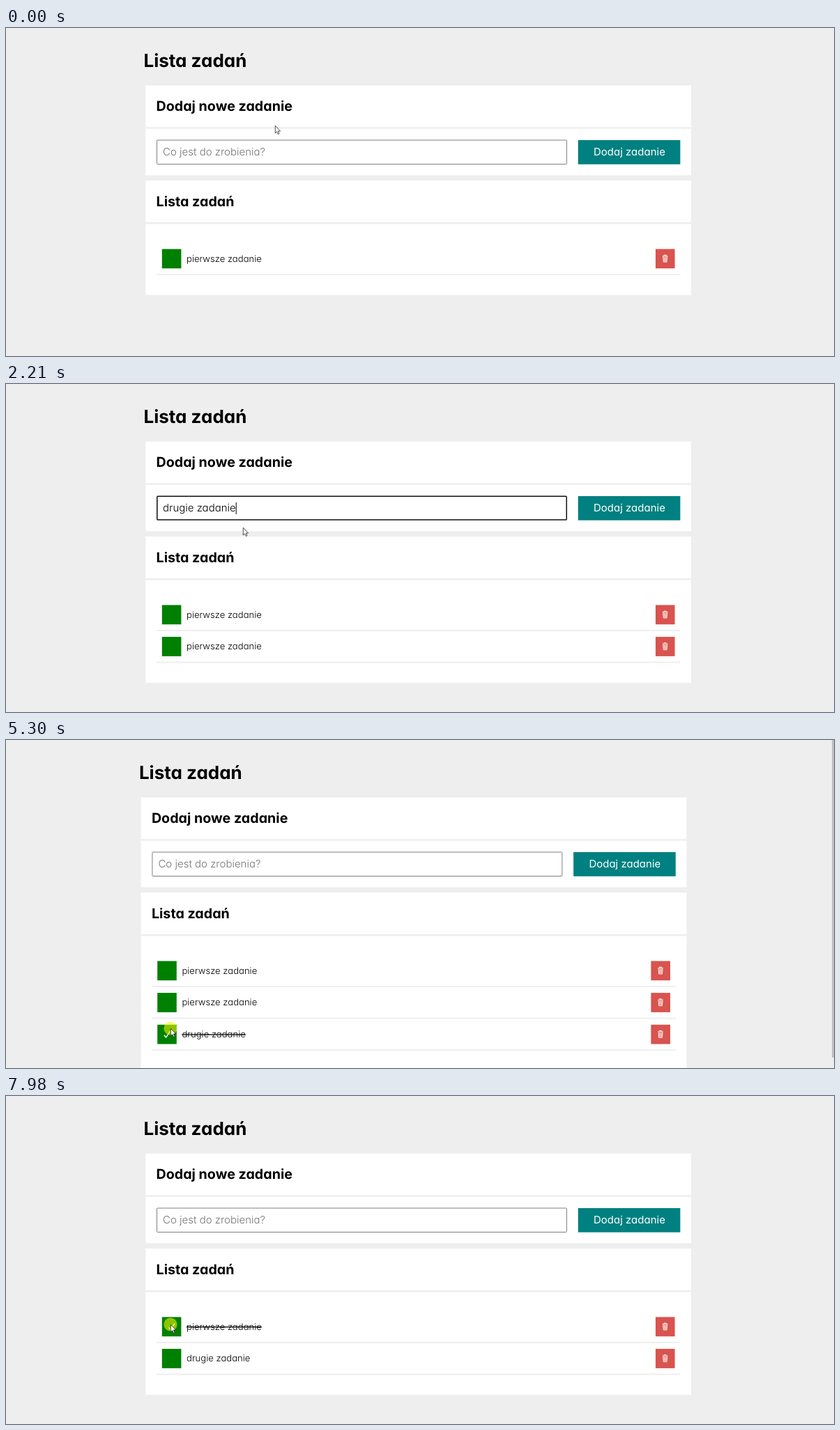
Write an HTML page that moves like this. It is 1188 px wide and 471 px high and loops after 8 s.

```html
<!DOCTYPE html>
<html lang="pl">
<head>
<meta charset="utf-8">
<title>Lista zadań</title>
<style>
  html, body { margin: 0; width: 100%; height: 100%; overflow: hidden; background: #eee; }
  svg { display: block; width: 1188px; height: 471px; }
  /* cv11 gives the round, single-storey a */
  text {
    font: 300 13.1px Inter, "Open Sans", sans-serif;
    font-feature-settings: "cv11";
    white-space: pre;
    text-rendering: geometricPrecision;
  }
  .h1 { font-size: 26px; font-weight: 700; }
  .h2 { font-size: 19.7px; font-weight: 700; }
  .field { font-size: 15px; }
  .label { font-weight: 400; fill: #fff; }
  .hint { fill: #757575; }
  .done { text-decoration: line-through; }
  .panel { fill: #fff; }
</style>
</head>
<body>
<svg viewBox="0 0 1188 471">
  <rect width="1188" height="471" fill="#eee"/>
  <g id="page">
    <text class="h1" x="197.5" y="56">Lista zadań</text>
    <rect class="panel" x="200.3" y="82.5" width="782.7" height="59.7"/>
    <rect class="panel" x="200.3" y="144.7" width="782.7" height="66.8"/>
    <text class="h2" x="215.5" y="119">Dodaj nowe zadanie</text>
    <rect id="box" fill="#fff"/>
    <text id="input" class="field" x="225" y="183"></text>
    <rect id="caret" y="170" width="1" height="17"/>
    <rect x="820.8" y="161" width="146.6" height="34.7" fill="#008080"/>
    <text class="field label" x="843" y="183">Dodaj zadanie</text>
    <rect class="panel" x="200.3" y="219" width="782.7" height="60"/>
    <text class="h2" x="215.5" y="256">Lista zadań</text>
    <rect id="list" class="panel" x="200.3" y="281.4" width="782.7"/>
    <g id="rows"></g>
  </g>
  <rect id="bar" x="1185" width="3" height="456" fill="#c1c1c1"/>
  <g id="mouse">
    <circle id="click" r="9.6" fill="#ff0" fill-opacity=".55"/>
    <path id="arrow" d="M.3 .3V11L2.7 8.8L4.4 12.6L6 11.8L4.4 8.1H7.6Z" fill="#fff" stroke="#222" stroke-width=".8"/>
    <path id="beam" d="M-2.3 -5H-.5L0 -4.5L.5 -5H2.3M0 -4.5V4.5M-2.3 5H-.5L0 4.5L.5 5H2.3" fill="none" stroke="#333" stroke-width=".9"/>
  </g>
</svg>
<script>
const LOOP = 8000, PITCH = 45.7;
const FIRST = "pierwsze zadanie", SECOND = "drugie zadanie";
const $ = id => document.getElementById(id);
const set = (el, attrs) => { for (const k in attrs) el.setAttribute(k, attrs[k]); };
const show = (el, on) => set(el, { visibility: on ? "visible" : "hidden" });
const within = (t, a, b) => t >= a && t < b;

// start, end, steps, target x, target y, optional bend point
const moves = [
  [70, 200, 3, 535, 177],
  [1370, 1430, 2, 340, 206],
  [2340, 2530, 4, 235, 339],
  [2730, 2870, 3, 232, 368],
  [4150, 4440, 5, 236, 414],
  [5430, 6080, 10, 929, 331, 520, 248],
  [6140, 6210, 2, 939, 331],
  [6600, 7230, 10, 207, 317, 560, 318],
  [7360, 7580, 4, 236, 328]
];
const presses = [[3220, 3350], [3880, 3950], [4770, 4900], [5300, 5370], [6470, 6530], [7910, LOOP]];

function pointer(t) {
  let x = 386, y = 140;
  for (const [a, b, n, tx, ty, bx = (x + tx) / 2, by = (y + ty) / 2] of moves) {
    if (t < a) break;
    const gap = (b - a) / (n - 1);
    const p = Math.min(1, (Math.floor((t - a) / gap + .02) + 1) / n);
    const e = p * p * (3 - 2 * p), q = 1 - e;
    x = q * q * x + 2 * q * e * bx + e * e * tx;
    y = q * q * y + 2 * q * e * by + e * e * ty;
  }
  return [x, y];
}

function typed(t) {
  const count = (from, gap) => Math.floor((t - from) / gap) + 1;
  if (within(t, 270, 630)) return FIRST.slice(0, Math.min(4, count(270, 68)));
  if (within(t, 630, 1300)) return FIRST.slice(0, 4 + Math.ceil(count(630, 66) * 1.2));
  if (within(t, 1360, 2340)) return SECOND.slice(0, count(1360, 65));
  return "";
}

function tasks(t) {
  const list = [[FIRST, t >= 7980]];
  if (within(t, 1300, 6530)) list.push([FIRST, within(t, 3350, 3950)]);
  if (t >= 2340) list.push([SECOND, within(t, 4830, 5370)]);
  return list;
}

const row = ([label, done], i) => `<g transform="translate(0 ${i * PITCH})">
  <rect x="223.8" y="317.4" width="27.6" height="27.8" fill="#008000"/>
  ${done ? '<path d="M233.5 332.4L236.3 335.6L242 326.6" fill="none" stroke="#fff" stroke-width="1.4"/>' : ""}
  <text x="259" y="335.7" class="${done ? "done" : ""}">${label}</text>
  <rect x="932" y="317.4" width="27.6" height="27.8" fill="#d9534f"/>
  <path d="M942 327.4H949.4M944.2 327V326H947.2V327M942.7 328L943.3 336H948.1L948.7 328M944.7 329V335M946.7 329V335"
    fill="#fff" fill-opacity=".25" stroke="#fbeee6" stroke-width="1"/>
  <rect x="216" y="352.9" width="751.5" height="2" fill="#eee"/></g>`;

let lastRows = "", lastText = null;

function draw(t) {
  const list = tasks(t), rows = list.map(row).join("");
  if (rows !== lastRows) $("rows").innerHTML = lastRows = rows;
  const tall = list.length > 2;
  set($("list"), { height: 56.3 + list.length * PITCH });
  set($("page"), { transform: `translate(${tall ? -6.6 : 0} 0)` });
  show($("bar"), tall);

  const focus = within(t, 200, 2470);
  set($("box"), focus
    ? { x: 216.8, y: 161.3, width: 587.5, height: 33.8, rx: 1.2, stroke: "#101010", "stroke-width": 1.5 }
    : { x: 216.5, y: 161, width: 588, height: 34.5, rx: 1, stroke: "#808080", "stroke-width": 1 });

  const text = typed(t), input = $("input");
  if (text !== lastText) {
    lastText = text;
    input.textContent = text || "Co jest do zrobienia?";
    input.classList.toggle("hint", !text);
    set($("caret"), { x: 225 + input.getComputedTextLength() });
    show($("caret"), text !== "");
  }

  const [x, y] = pointer(t), overInput = within(t, 140, 1430);
  set($("mouse"), { transform: `translate(${x} ${y})` });
  show($("arrow"), !overInput);
  show($("beam"), overInput);
  show($("click"), presses.some(([a, b]) => within(t, a, b)));
}

const start = performance.now();
function tick() {
  draw((performance.now() - start) % LOOP);
  requestAnimationFrame(tick);
}
tick();
</script>
</body>
</html>
```
